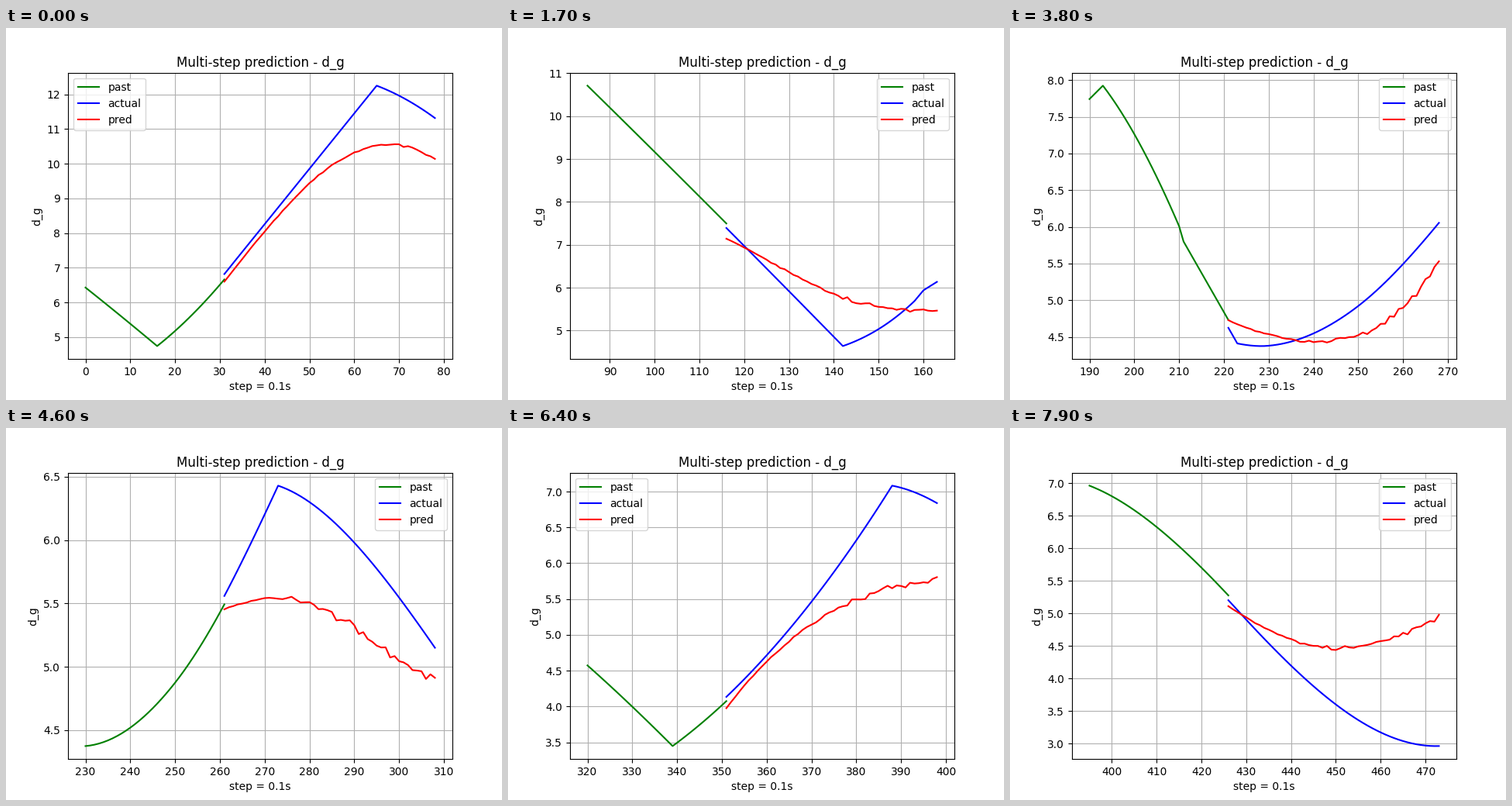
Animation of 640x480 px, one loop 8 s. Source, as a matplotlib script:

```python
import numpy as np
import matplotlib.pyplot as plt
from matplotlib.animation import FuncAnimation

FRAMES, STRIDE = 80, 5
PAST, AHEAD = 32, 48
H = np.arange(AHEAD)

# Measured signal: step, value, then slopes at both ends of the piece
# that follows (a straight line if left out).
PIECES = [
    (0, 6.43, -.1025, -.108),
    (16, 4.743, .102, .164),
    (34, 7.14),
    (66, 12.25, -.049, -.098),
    (80, 11.22, -.102, -.1068),
    (143, 4.64, .036, .1),
    (159, 5.69),
    (161, 5.94, .066, .061),
    (177, 6.95),
    (193, 7.925, -.08, -.142),
    (210, 6.01),
    (211, 5.80),
    (224, 4.41, -.012, .002),
    (230, 4.375, .003, .045),
    (250, 4.875, .045, .076),
    (274, 6.43, -.012, -.051),
    (309, 5.151, -.0495, -.0625),
    (339, 3.447, .046, .1),
    (389, 7.083, -.012, -.076),
    (431, 4.905, -.074, .002),
    (474, 2.965),
]

# Forecast shapes at a few frames, sampled along the horizon.
KNOTS = [0, 12, 24, 36, 47]
SHAPES = {
    0: [6.60, 8.50, 9.95, 10.55, 10.10],
    17: [7.14, 6.475, 5.855, 5.53, 5.485],
    29: [6.92, 6.85, 6.435, 5.885, 5.555],
    46: [5.455, 5.545, 5.42, 5.12, 4.907],
    58: [4.262, 4.02, 3.97, 4.14, 4.44],
    71: [6.873, 7.25, 7.20, 6.815, 6.332],
    79: [5.113, 4.655, 4.47, 4.61, 4.947],
}


def hermite(t, y0, y1, m0, m1):
    return (y0 + (y1 - y0) * t * t * (3 - 2 * t)
            + m0 * t * (1 - t) ** 2 - m1 * t * t * (1 - t))


def build_signal():
    y = np.zeros(PIECES[-1][0] + 1)
    for (x0, y0, *slopes), (x1, y1, *_) in zip(PIECES, PIECES[1:]):
        n = x1 - x0
        m0, m1 = slopes or [(y1 - y0) / n] * 2
        y[x0:x1 + 1] = hermite(np.arange(n + 1) / n, y0, y1, m0 * n, m1 * n)
    return y


signal = build_signal()


def future(k):
    start = k * STRIDE + PAST
    return signal[start:start + AHEAD]


def trend(k):
    """Damped quadratic through the coming window."""
    c = np.polyfit(H, future(k), 2)
    c[-1] = 0
    return signal[k * STRIDE + PAST - 1] + 0.5 * np.polyval(c, H)


key_frames = list(SHAPES)
offsets = np.array([np.polyval(np.polyfit(KNOTS, v, 4), H) - trend(k)
                    for k, v in SHAPES.items()])


def forecast(k):
    offset = [np.interp(k, key_frames, col) for col in offsets.T]
    noise = np.random.default_rng(k).normal(0, 0.02, AHEAD)
    return trend(k) + offset + noise * np.clip(H / 30, 0.1, 1)


fig, ax = plt.subplots(figsize=(6.4, 4.8), dpi=100)


def draw(k):
    s = k * STRIDE
    x = s + PAST - 1 + H
    ax.clear()
    ax.plot(np.arange(s, s + PAST), signal[s:s + PAST], "g", label="past")
    ax.plot(x, future(k), "b", label="actual")
    ax.plot(x, forecast(k), "r", label="pred")
    ax.set_title("Multi-step prediction - d_g")
    ax.set_xlabel("step = 0.1s")
    ax.set_ylabel("d_g")
    ax.grid(True)
    ax.legend(loc="best")
    return ax.lines


anim = FuncAnimation(fig, draw, frames=FRAMES, interval=100,
                     repeat=True, repeat_delay=0, blit=False)
plt.show()
```
